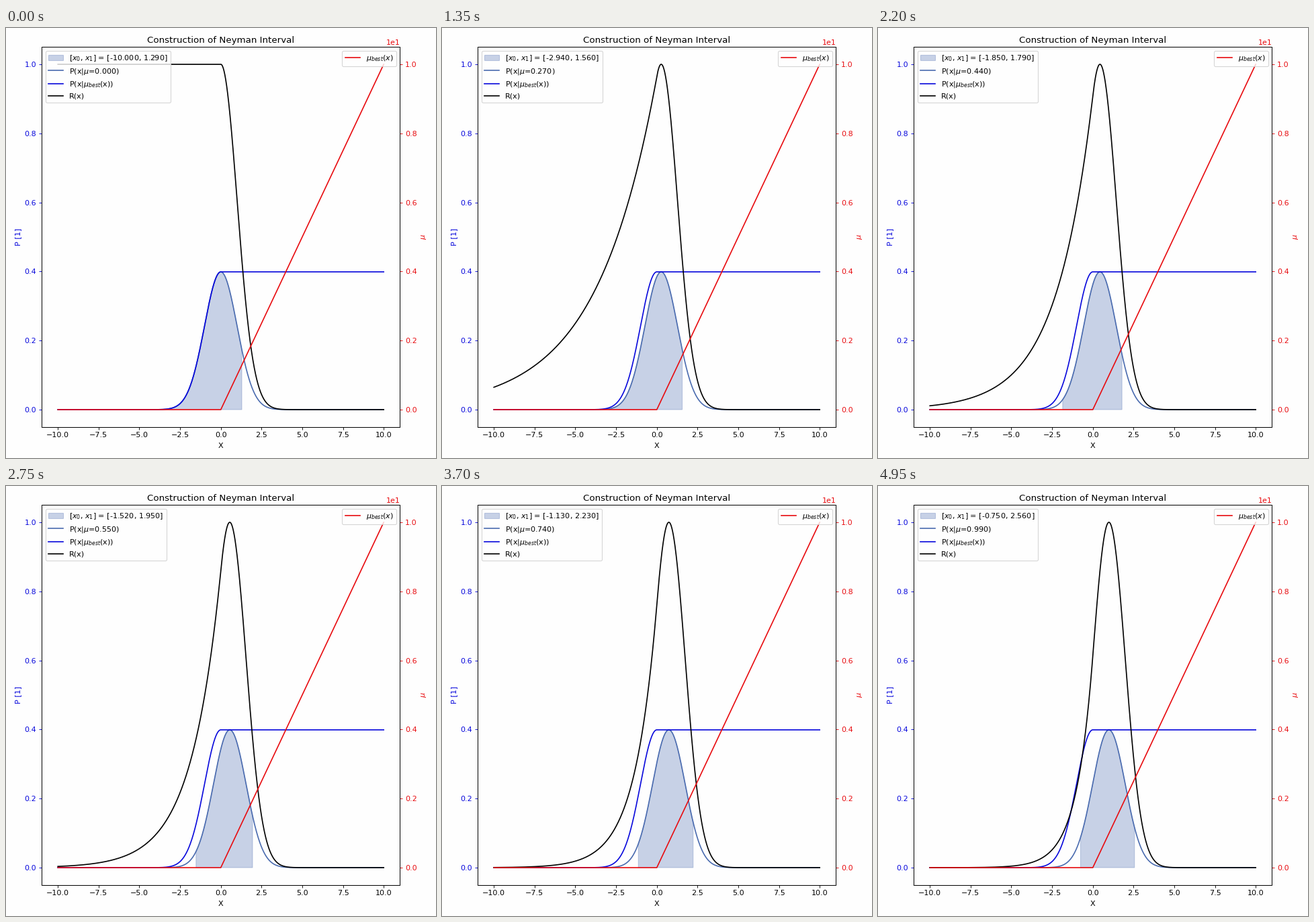
Animation of 640 by 640 pixels, one loop 5 s. Source, as a matplotlib script:

```python
import math

import numpy as np
import matplotlib.pyplot as plt
from matplotlib.animation import FuncAnimation

SIZE = 640
FRAMES = 100
INTERVAL = 50
MU_STEP = 0.01
CONFIDENCE = 0.9
BAND_COLOR = "#4a6baf"
BLUE = "#0808dc"
RED = "#e80c10"
PAPER = "#fefefe"

x = np.round(np.linspace(-10, 10, 2001), 2)
mu_best = np.maximum(x, 0)
erf = np.vectorize(math.erf)


def gauss(x, mu):
    return np.exp(-0.5 * (x - mu) ** 2) / math.sqrt(2 * math.pi)


def log_ratio(mu):
    """Log of P(x|mu) / P(x|mu_best)."""
    return np.where(x < 0, mu * x - mu**2 / 2, -0.5 * (x - mu) ** 2)


def acceptance(mu, log_r):
    """Indices of the interval filled in order of falling likelihood ratio."""
    cdf = 0.5 * (1 + erf((x - mu) / math.sqrt(2)))
    order = np.argsort(-log_r, kind="stable")
    low = np.minimum.accumulate(order)
    high = np.maximum.accumulate(order)
    k = np.argmax(cdf[high] - cdf[low] >= CONFIDENCE)
    return low[k], high[k]


def color_axis(axes, label, color):
    axes.set_ylabel(label, color=color)
    axes.tick_params("y", colors=color)
    axes.ticklabel_format(axis="y", style="sci", scilimits=(0, 0))


fig, ax = plt.subplots(figsize=(8, 8), dpi=80, facecolor=PAPER)
fig.subplots_adjust(left=53 / SIZE, right=586.4 / SIZE,
                    bottom=1 - 593.7 / SIZE, top=1 - 28.3 / SIZE)
ax.set_facecolor(PAPER)
ax.set_title("Construction of Neyman Interval")
ax.set_xlabel("X", labelpad=5)

band, = ax.fill([0, 0, 0], [0, 0, 0], color=BAND_COLOR, alpha=0.3, label="band")
p_line, = ax.plot(x, gauss(x, 0), color=BAND_COLOR, label="P")
best_line, = ax.plot(x, gauss(x, mu_best), color=BLUE,
                     label=r"P(x|$\mu_{best}$(x))")
r_line, = ax.plot(x, np.exp(log_ratio(0)), color="k", label="R(x)")
ax.set_xlim(-11, 11)
ax.set_ylim(-0.05, 1.05)
color_axis(ax, "P [1]", BLUE)
legend = ax.legend(handles=[band, p_line, best_line, r_line], loc="upper left")
band_text, p_text = legend.get_texts()[:2]

ax_mu = ax.twinx()
ax_mu.plot(x, mu_best, color=RED, label=r"$\mu_{best}(x)$")
ax_mu.set_ylim(-0.5, 10.5)
color_axis(ax_mu, r"$\mu$", RED)
ax_mu.yaxis.get_offset_text().set_color(RED)
ax_mu.legend(loc="upper right")


def update(i):
    mu = i * MU_STEP
    log_r = log_ratio(mu)
    p = gauss(x, mu)
    a, b = acceptance(mu, log_r)

    xs, ys = x[a:b + 1], p[a:b + 1]
    band.set_xy(np.column_stack([np.r_[xs[0], xs, xs[-1]], np.r_[0, ys, 0]]))
    p_line.set_ydata(p)
    r_line.set_ydata(np.exp(log_r))
    band_text.set_text(f"[$x_0$, $x_1$] = [{x[a]:.3f}, {x[b]:.3f}]")
    p_text.set_text(rf"P(x|$\mu$={mu:.3f})")
    return band, p_line, r_line


anim = FuncAnimation(fig, update, frames=FRAMES, interval=INTERVAL,
                     repeat=True, repeat_delay=0, blit=False)
plt.show()
```
